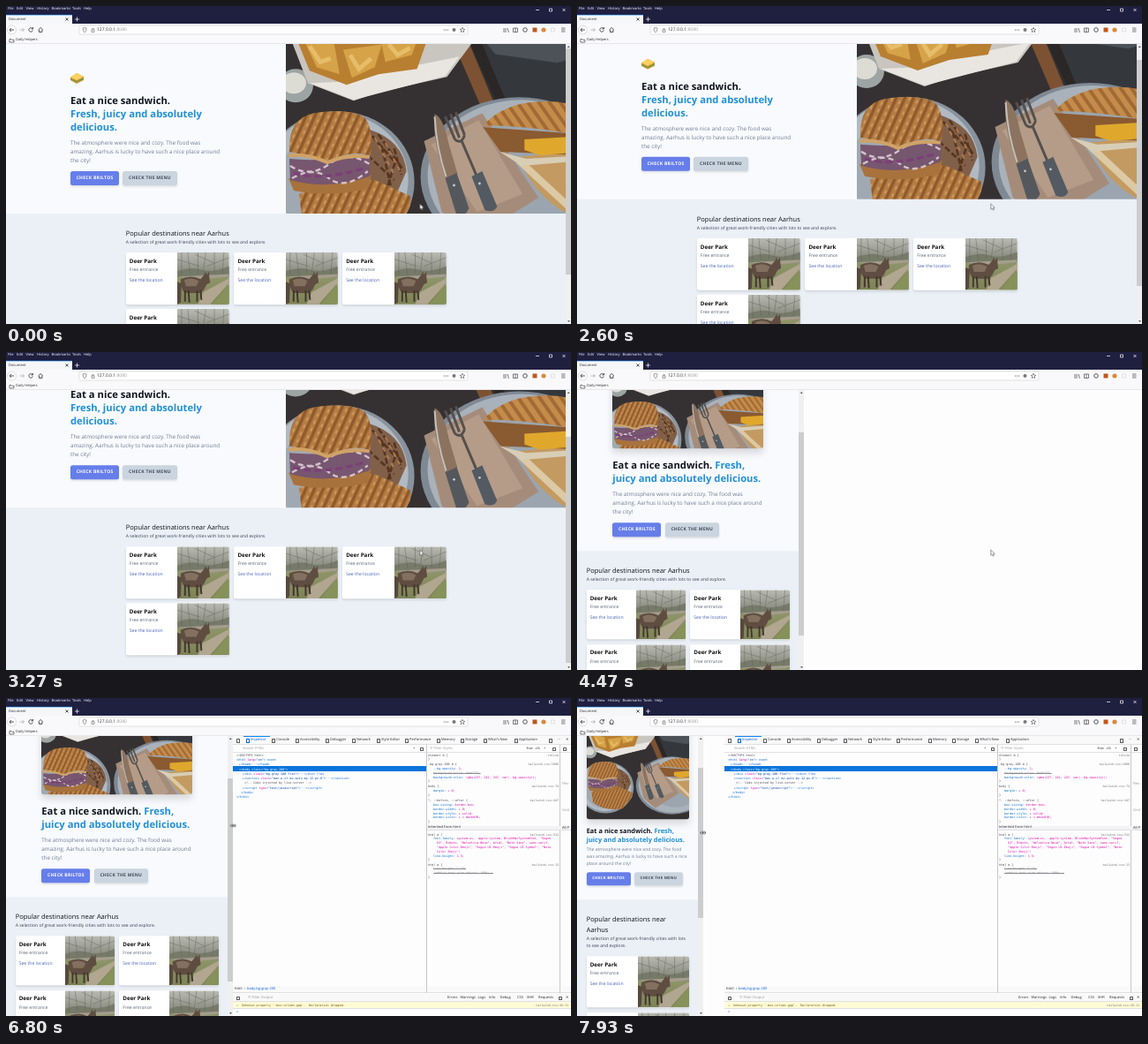
Write an HTML page that moves like this. It is 640x360 px and loops after 8000 ms.

```html
<!DOCTYPE html>
<html lang="en">
<head>
<meta charset="utf-8">
<title>Responsive page</title>
<style>
html, body { margin: 0; width: 100%; height: 100%; overflow: hidden; background: #fff; }
body { position: relative; font-family: "Open Sans", "Noto Sans", sans-serif; text-rendering: geometricPrecision; }
#stage { position: absolute; left: 0; top: 0; width: 640px; height: 360px; overflow: hidden; background: #fdfdfe; }
#stage > svg, .bar, .layer { position: absolute; left: 0; top: 0; }
.layer { width: 640px; height: 360px; }
.t { position: absolute; margin-top: .7px; white-space: pre; line-height: 0; font-size: 4px; color: #2a2a2e; }
.menu { color: #fff; font-size: 4.1px; }
.url { font-size: 5px; }
.dim { color: #999; }
.on { color: #0060df; }
.right { transform: translateX(-100%); }

/* page */
#view { position: absolute; left: 0; top: 43px; width: 640px; height: 317px; overflow: hidden; container-type: inline-size; background: #ebf0f7; }
#page { width: calc(100% - 5.67px); }
#page h1, #page h2, #page h3, #page p { margin: 0; position: relative; top: .08em; }
.hero { display: flex; background: #f8fafd; }
.copy { width: 50%; box-sizing: border-box; padding: 32px 0 32px 73px; }
.side { width: 50%; position: relative; }
.side svg { position: absolute; width: 100%; height: 100%; }
.logo { display: block; width: 15px; height: 13.33px; }
.shot { display: none; width: 100%; border-radius: 2.7px; box-shadow: 0 5px 8px rgba(0,0,0,.14); }
h1 { max-width: 174px; font-size: 11.24px; line-height: 15px; color: #12161f; }
#page h1 { margin-top: 10.67px; }
h1 span { display: block; color: #2090d8; }
.copy p { width: 174px; font-size: 6.3px; line-height: 10px; color: #717d94; }
#page .copy p { margin-top: 5.33px; }
.buttons { display: flex; gap: 4.3px; margin-top: 8px; }
.buttons b { padding: 4px 6.67px; border-radius: 2.5px; font-size: 5.05px; line-height: 8px; font-weight: 700; letter-spacing: .05em; white-space: nowrap; background: #cbd5e0; color: #434d5e; box-shadow: 0 1.5px 2.5px rgba(0,0,0,.12); }
.buttons b:first-child { background: #667eea; color: #fff; }
section { max-width: 384px; box-sizing: border-box; margin: 0 auto; padding: 16px 10.67px; }
h2 { font-size: 7.5px; line-height: 12px; font-weight: 500; color: #10141c; }
section > p { font-size: 5.07px; line-height: 8px; color: #3a4454; }
.cards { display: grid; grid-template-columns: repeat(3, 1fr); gap: 5.33px; margin-top: 8px; }
.card { display: flex; background: #fff; border-radius: 2px; overflow: hidden; box-shadow: 0 1.5px 3px rgba(0,0,0,.13); }
.card div { width: 50%; box-sizing: border-box; padding: 4px 0 0 4px; white-space: nowrap; }
.card svg { width: 50%; aspect-ratio: 1; }
h3 { font-size: 6.27px; line-height: 10px; color: #111; }
.card p { font-size: 5.1px; line-height: 8px; color: #5c687a; }
#page .card p { margin-top: 1.5px; }
#page .card p + p { margin-top: 4px; color: #4a63b8; }
@container (max-width: 340px) {
  .copy { width: 192px; margin: 0 auto; padding: 16px 10.67px; }
  .side { display: none; }
  .shot { display: block; height: 85.33px; margin-top: 10.67px; }
  h1 span { display: inline; }
  .cards { grid-template-columns: repeat(2, 1fr); }
}
@container (max-width: 213px) {
  .copy { width: 100%; max-width: 149.3px; }
  .shot { height: auto; aspect-ratio: 1; margin-top: 8px; }
  h1 { font-size: 7.45px; line-height: 10px; }
  #page h1 { margin-top: 8px; }
  .copy p { width: auto; font-size: 5.05px; line-height: 8px; }
  #page .copy p { margin-top: 2.67px; }
  .buttons { margin-top: 5.33px; }
  .buttons b { font-size: 4.42px; line-height: 7px; }
  .cards { grid-template-columns: 1fr; }
}
#track { position: absolute; right: 0; top: 0; width: 5.67px; height: 100%; background: #f0f0f1; }
#track i { position: absolute; left: 1.4px; width: 3px; height: 2px; background: #606060; top: 2px; clip-path: polygon(50% 0, 100% 100%, 0 100%); }
#track i + i { top: auto; bottom: 2px; transform: scaleY(-1); }
#thumb { position: absolute; left: 0; width: 100%; background: #cdcdcd; }

/* inspector */
.bar { right: 0; background: #f9f9fa; border: solid #e0e0e2; border-width: 0 0 .5px; box-sizing: border-box; }
.selected { right: 164px; border: 0; background: #0a74da; }
.tabline { left: 12px; top: 43px; width: 30px; height: .8px; border: 0; background: #0a84ff; }
.line { position: absolute; top: 53px; width: 1px; height: 281px; background: #c8c8cc; }
#dev { width: auto; right: 0; overflow: hidden; }
.code { font: 3.42px/0 "DejaVu Sans Mono", monospace; color: #0068cc; }
.code b { font-weight: 400; color: #dd00a9; }
.code i { font-style: normal; color: #003eaa; }
.pick, .pick b, .pick i { color: #fff; }
.plain { color: #4a4a50; }
.off, .off b { color: #8a8a90; text-decoration: line-through; }
.src { color: #737373; }
.warning { color: #715100; }
.ico { position: absolute; width: 2.4px; height: 2.4px; margin: -1.6px 0 0; border: .5px solid #5c5c61; border-radius: .6px; }
.ico.on { border-color: #0060df; }
</style>
</head>
<body>
<svg width="0" height="0" style="position:absolute">
  <defs>
    <pattern id="grill" width="9" height="9" patternUnits="userSpaceOnUse" patternTransform="rotate(24)">
      <path d="M0 0H9V9H0Z" fill="#b67d44"/><path d="M0 0H3.500V9H0Z" fill="#8f5a2c"/><path d="M6 1h2v4h-2z" fill="#cb9a5c"/>
    </pattern>
    <pattern id="grill2" width="10" height="8" patternUnits="userSpaceOnUse" patternTransform="rotate(-35)">
      <path d="M0 0H10V8H0Z" fill="#c48b4a"/><path d="M0 0H4V8H0Z" fill="#a16a35"/>
    </pattern>
    <linearGradient id="park" x2="0" y2="1">
      <stop stop-color="#b9bab2"/><stop offset=".42" stop-color="#85867a"/><stop offset=".5" stop-color="#8d9468"/><stop offset="1" stop-color="#7d8355"/>
    </linearGradient>
    <filter id="soft" x="0" y="0" width="1" height="1"><feGaussianBlur stdDeviation=".8"/></filter>
    <g id="lunch" filter="url(#soft)">
      <path d="M300-40H655V319H300Z" fill="#353132"/>
      <path d="M535 30H655V112L565 105Z" fill="#34383d"/>
      <path d="M545 43l10 12 70 10 30-8V30H545z" fill="#4c5258"/>
      <path d="M502 30h18l34 82-14 6z" fill="#7d5232"/>
      <path d="M520 30h14l34 80-10 3z" fill="#2b2726"/>
      <ellipse cx="328" cy="91" rx="20" ry="19" fill="#9da4a4"/><ellipse cx="326" cy="88" rx="14" ry="12" fill="#dddcd4"/>
      <path d="M318 26L342 88l52 20 30-10 76-17 28-38 6-18z" fill="#c9c5bf"/>
      <path d="M344 88l50 19 104-27 16-22-70 14-50 14z" fill="#e9e6e1"/>
      <path d="M326 30l18 44 42 16 36-12 44-6 16-46z" fill="#b87f31"/>
      <path d="M336 36l16 34 26 8-6-34zM382 50l10 32 26-12 8-26zM424 36l6 28 30-8 8-22z" fill="#d6a348"/>
      <path d="M344 46l12 18 12-4M390 56l10 16 14-12M434 44l10 12 14-8" fill="none" stroke="#e6bd69" stroke-width="5"/>
      <ellipse cx="376" cy="200" rx="87" ry="80" fill="#89939d"/><ellipse cx="374" cy="198" rx="82" ry="76" fill="#b1bac2"/>
      <ellipse cx="376" cy="202" rx="68" ry="64" fill="#a0a9b2"/>
      <path d="M410 140q40 12 44 48l-14 32-36-18z" fill="#81604a"/>
      <path d="M415 148l26 30-8 26M422 146l28 40M410 170l30 28M426 160l10 44M440 162l8 30" fill="none" stroke="#58351f" stroke-width="2.600" stroke-dasharray="7 3"/>
      <path d="M418 150l22 42M430 156l18 34" fill="none" stroke="#b17b4a" stroke-width="2" stroke-dasharray="5 5"/>
      <path d="M332 214q40-18 86-16l40 18q4 14-10 26l-20 24q-60 8-92-20z" fill="url(#grill)"/>
      <path d="M320 196q44 14 94-4l-4 16q-44 10-84 2z" fill="#a8723c"/>
      <path d="M321 174q40 4 92-6l-1 26q-48 16-90 4z" fill="#77566f"/>
      <path d="M322 182q22 14 44-2t46 0M324 196q24-14 42 0t44-8" fill="none" stroke="#d3c1cc" stroke-width="2.400" stroke-dasharray="6 4"/>
      <path d="M326 190q30 10 82-6" fill="none" stroke="#7b3f78" stroke-width="3" stroke-dasharray="8 4"/>
      <path d="M321 166q-2-38 28-44 38-6 56 4 12 10 8 44-20-6-48 6-24-6-44-10z" fill="url(#grill)"/>
      <path d="M320 170q22-2 44 8 24-10 48-6" fill="none" stroke="#cfa367" stroke-width="4"/>
      <ellipse cx="582" cy="194" rx="112" ry="90" fill="#7f8994"/><ellipse cx="584" cy="193" rx="106" ry="86" fill="#a9b1ba"/>
      <ellipse cx="592" cy="192" rx="84" ry="70" fill="#9ba5af"/>
      <path d="M474 154l66-32 64 96-74 46-36-30z" fill="#a58c7a"/><path d="M482 158l54-28 50 84-52 20z" fill="#b59c89"/>
      <path d="M486 123q10 4 16 34l10 34-13 5q-16-40-13-73z" fill="#8c7360"/><path d="M486 126q2 36 13 68" fill="none" stroke="#c3bfba" stroke-width="2"/>
      <path d="M498 196l13-6 14 40q-4 10-14 8z" fill="#54585c"/>
      <path d="M498 126l11 26M504 123l10 27M510 121l10 26M509 152q7 6 11-5M516 152l18 42" fill="none" stroke="#55504d" stroke-width="3"/>
      <path d="M528 194l12-6 17 40q-4 8-14 4z" fill="#535a61"/>
      <circle cx="508" cy="204" r="1.400" fill="#c9cbd0"/><circle cx="537" cy="202" r="1.400" fill="#c9cbd0"/>
      <path d="M580 172l75-8v80q-50-16-75-72z" fill="#c39a62"/><path d="M582 176l56 52" stroke="#dcc9a5" stroke-width="8"/>
      <path d="M541 138l114 8v24l-94-4z" fill="#8a5a30"/>
      <path d="M588 152l67-4v18l-50 4-17-6z" fill="#dfa82c"/>
      <path d="M560 166l30 8 65-4v6l-70 6z" fill="#d8ceb6"/>
      <path d="M542 136q12-16 40-24 40-8 73 4v32q-60-12-113-12z" fill="url(#grill2)"/>
    </g>
    <g id="deer">
      <path d="M0 0H60V60H0Z" fill="url(#park)"/>
      <path d="M0 22q16-6 28-2t32-4v12H0z" fill="#767a68"/>
      <path d="M5 0v26M12 0l3 25M24 0v24M33 0l-3 23M43 0v24M54 0l-2 28M0 8l26 8M60 6L34 16M20 2l22 10" fill="none" stroke="#5f6056" stroke-opacity=".45"/>
      <path d="M0 28l60-3v3L30 31z" fill="#a49d8d"/>
      <path d="M30 46l30-16v5L38 60H24z" fill="#b1a690"/><path d="M60 38v22H40z" fill="#87915a"/>
      <path d="M4 31q12-6 23 0l4-5 2-4 1 4 3-4 0 5 1 8-4 2-3 6-4 4H9q-6-6-5-16z" fill="#5f4d41"/>
      <path d="M8 32q9-4 17 1l-3 6H10z" fill="#83705f"/>
      <path d="M9 44v13M13 44l1 14M23 44v13M27 44l1 11" stroke="#43362d" stroke-width="2"/>
      <path d="M0 34l5 2-1 22-4 2z" fill="#57483d"/>
    </g>
  </defs>
</svg>

<div id="stage">
  <div id="view">
    <div id="page">
      <div class="hero">
        <div class="copy">
          <svg class="logo" viewBox="0 0 15 13.300"><path d="M0 6l7-5 8 4v4l-8 4-7-4z" fill="#d8963f"/><path d="M0 7l7 3 8-4v2l-8 3.400-7-3z" fill="#7a9a3b"/><path d="M0 5.500L7 1l8 4-8 4z" fill="#fbd25f"/></svg>
          <svg class="shot" viewBox="317 -19 318 318" preserveAspectRatio="xMidYMid slice"><use href="#lunch"/></svg>
          <h1>Eat a nice sandwich. <span>Fresh, juicy and absolutely delicious.</span></h1>
          <p>The atmosphere were nice and cozy. The food was amazing. Aarhus is lucky to have such a nice place around the city!</p>
          <div class="buttons"><b>CHECK BRILTOS</b><b>CHECK THE MENU</b></div>
        </div>
        <div class="side"><svg viewBox="317 -19 318 318" preserveAspectRatio="xMidYMid slice"><use href="#lunch"/></svg></div>
      </div>
      <section>
        <h2>Popular destinations near Aarhus</h2>
        <p>A selection of great work-friendly cities with lots to see and explore.</p>
        <div class="cards" id="cards"></div>
      </section>
    </div>
    <div id="track"><i></i><i></i><div id="thumb"></div></div>
  </div>

  <div id="dev" class="layer"></div>
  <div id="rules" class="layer"></div>

  <svg width="640" height="43">
    <path d="M0 0H640V20H0Z" fill="#1f1f40"/>
    <path d="M0 10H75V20H0Z" fill="#f5f6f7"/><path d="M0 10.200H75" stroke="#0a84ff" stroke-width=".6"/>
    <path d="M0 20H640V43H0Z" fill="#f9f9fb"/><path d="M0 42.700H640" stroke="#d5d5d9" stroke-width=".6"/>
    <rect x="83" y="22" width="440" height="10" rx="1" fill="#fff" stroke="#d2d2d6" stroke-width=".6"/>
    <g fill="none" stroke="#fff" stroke-width=".7"><path d="M600 4.500h4M630.500 3l3 3m0-3l-3 3M78 15h5M80.500 12.500v5"/><path d="M615.500 3h3v3h-3z"/></g>
    <g fill="none" stroke="#45454b" stroke-width=".9">
      <circle cx="6.500" cy="27" r="5" fill="#fff" stroke="#bbb" stroke-width=".5"/>
      <path d="M9 27H4m2-2l-2 2 2 2M67.500 13.500l3 3m0-3l-3 3"/>
      <path d="M15.500 27h5m-2-2l2 2-2 2" stroke="#b5b5ba"/>
      <path d="M30 25.500a2.300 2.300 0 1 0 .4 2M30.500 24v2h-2M36.500 27l2.700-2.500 2.700 2.500M37.500 27v2.500h3.400V27"/>
      <path d="M87 25q2 0 2-1 0 1 2 1 0 4-2 5-2-1-2-5zM97 27h3v2.500h-3zM97.500 27v-1q1-2 2 0v1" stroke="#77777c" stroke-width=".7"/>
      <path d="M517 24.300l.8 1.900 2 .2-1.500 1.300.5 2-1.800-1.100-1.800 1.100.5-2-1.500-1.300 2-.2z" stroke-width=".6"/>
      <path d="M564 25v5M566 25v5M568 25l1.500 5M574.500 25h5v4.500h-5zM577 25v4.500M4 37.500h2l.6.800H9v2.700H4z" stroke-width=".7"/>
      <circle cx="588" cy="27" r="2.300"/><path d="M617.500 25h4v4h-4z" stroke="#ddd"/>
      <path d="M629 25h4.500M629 27h4.500M629 29h4.500" stroke-width=".7"/>
    </g>
    <g fill="#45454b"><circle cx="496.500" cy="27" r=".6"/><circle cx="498.500" cy="27" r=".6"/><circle cx="500.500" cy="27" r=".6"/></g>
    <circle cx="507.500" cy="27" r="2" fill="#77777c"/>
    <path d="M596.500 24.500h5v5h-5z" fill="#c2571a"/><circle cx="609" cy="27" r="2.600" fill="#d98a3c"/>
  </svg>
  <div id="labels" class="layer"></div>

  <svg id="arrow" width="8" height="10"><path d="M.5.5v6.200l1.500-1.200 1 2 1-.5-.9-2h1.900z" fill="#fff" stroke="#333" stroke-width=".5"/></svg>
  <svg id="resize" width="10" height="6"><path d="M1 3h7M2.600 1.300L1 3l1.600 1.700M6.400 1.300L8 3 6.400 4.700" fill="none" stroke="#fff" stroke-width="1.800"/><path d="M1 3h7M2.600 1.300L1 3l1.600 1.700M6.400 1.300L8 3 6.400 4.700M4 1.500v3M5 1.500v3" fill="none" stroke="#333" stroke-width=".7"/></svg>
</div>

<script>
const LOOP = 8000;
const $ = id => document.getElementById(id);
const esc = s => s.replace(/&/g, '&amp;').replace(/</g, '&lt;').replace(/>/g, '&gt;');
const label = (x, y, html, cls = '') => `<span class="t ${cls}" style="left:${x}px;top:${y}px">${html}</span>`;
const bar = (x, y, h, bg = '#f9f9fa') => `<div class="bar" style="left:${x}px;top:${y}px;height:${h}px;background:${bg}"></div>`;
const icon = (x, y, cls = '') => `<div class="ico ${cls}" style="left:${x}px;top:${y}px"></div>`;
const row = (y, items, cls) => items.map(([x, text]) => label(x, y, text, cls)).join('');
const line = x => `<div class="line" style="left:${x}px"></div>`;

$('cards').innerHTML = `<div class="card">
  <div><h3>Deer Park</h3><p>Free entrance</p><p>See the location</p></div>
  <svg viewBox="0 0 60 60"><use href="#deer"/></svg></div>`.repeat(4);

$('labels').innerHTML =
  row(3, [[2, 'File'], [12, 'Edit'], [22.5, 'View'], [35, 'History'], [51.5, 'Bookmarks'], [75, 'Tools'], [88, 'Help']], 'menu') +
  label(3, 15, 'Document') + label(11, 38.6, 'Daily Helpers') +
  label(103, 26.6, '127.0.0.1<span class="dim">:8080</span>', 'url');

// Markup side of the inspector; x is measured from its left edge.
const tabs = [[20, 'Inspector'], [49, 'Console'], [76, 'Accessibility'], [110, 'Debugger'], [140, 'Network'], [168, 'Style Editor'],
  [200, 'Performance'], [236, 'Memory'], [263, 'Storage'], [289, "What's New"], [324, 'Application']];
const tree = [
  [4, '<!DOCTYPE html>', 'plain'], [4, '<html lang="en"> event'], [7, '▸<head>···</head>'], [7, '▾<body class="bg-gray-200">', 'pick'],
  [11, '▸<div class="bg-gray-100 flex">···</div> flex'], [11, '▸<section class="max-w-xl mx-auto my-12 px-6">···</section>'],
  [13, '<!-- Code injected by live-server -->', 'plain'], [11, '▸<script type="text/javascript">···<\/script>'], [9, '</body>'], [4, '</html>']];
const markup = s => esc(s).replace(/(\w+)=("[^"]*")/g, '<b>$1</b>=<i>$2</i>');

$('dev').innerHTML =
  `<div id="frame">${bar(0, 43, 10)}${bar(0, 53, 8.5, '#fff')}${bar(0, 326, 8)}${bar(0, 335, 8.5)}<div class="bar tabline"></div>` +
  tabs.map(([x, name], i) => icon(x - 5, 48, i ? '' : 'on') + label(x, 47.5, name, i ? '' : 'on')).join('') +
  icon(3.5, 48) + label(11, 57, 'Search HTML', 'dim') + icon(3.5, 339.3) + label(17, 339, '⛛ Filter Output', 'dim') + '</div>' +
  `<div id="tree"><div class="bar selected" style="top:77.2px;height:5.4px"></div>` +
  tree.map(([x, s, cls = ''], i) => label(x, 64 + i * 5.3, markup(s), 'code ' + cls)).join('') +
  label(2, 329.6, 'html &nbsp;›&nbsp; <span class="on">body.bg-gray-200</span>') + label(4, 355.5, '»', 'on') + '</div>' +
  `<div id="warn">${bar(0, 344, 7.5, '#fffbd6')}` +
  label(4, 347.5, "⚠  Unknown property '-moz-column-gap'.  Declaration dropped.", 'code warning') + '</div>';

// Style rules: top line, selector, source, declarations ("~" marks an overridden one).
const rules = [
  [64, 'element ⚙ {', 'inline', []],
  [74.5, '.bg-gray-200 ⚙ {', 'tailwind.css:1086', ['--bg-opacity: 1;', '~background-color: #edf2f7;', 'background-color: rgba(237, 242, 247, var(--bg-opacity));']],
  [99.5, 'body {', 'tailwind.css:74', ['margin: ▸ 0;']],
  [115.5, '*, ::before, ::after {', 'tailwind.css:447', ['box-sizing: border-box;', 'border-width: ▸ 0;', 'border-style: ▸ solid;', 'border-color: ▸ ○ #e2e8f0;']],
  [154, 'html ⚙ {', 'tailwind.css:312', ['font-family: system-ui, -apple-system, BlinkMacSystemFont, "Segoe',
    '  UI", Roboto, "Helvetica Neue", Arial, "Noto Sans", sans-serif,', '  "Apple Color Emoji", "Segoe UI Emoji", "Segoe UI Symbol", "Noto',
    '  Color Emoji";', 'line-height: 1.5;']],
  [188, 'html ⚙ {', 'tailwind.css:13', ['~line-height: 1.15;', '~-webkit-text-size-adjust: 100%; ⚠']]];
const declaration = s => s.includes(':') ? esc(s).replace(/^~?([\w-]+:)(.*)/, '$1<b>$2</b>') : `<b>${esc(s)}</b>`;
const rule = ([y, selector, source, lines]) =>
  label(478, y, selector, 'code plain') + label(626, y, source, 'code src right') +
  lines.map((s, i) => label(484, y + 4.8 * (i + 1), declaration(s), 'code ' + (s[0] === '~' ? 'off' : ''))).join('') +
  label(478, y + 4.8 * (lines.length + 1), '}', 'code plain');

$('rules').innerHTML = line(476) + line(627) + bar(477, 144.5, 5.5, '#f3f3f6') +
  rules.map(rule).join('') + label(478, 146.8, 'Inherited from html') +
  row(57, [[461, '+'], [589, ':hov'], [599, '.cls'], [609, '+']]) + icon(469, 57.3) + icon(619, 57.3) + icon(631, 57.3) +
  label(480, 57, '⛛ Filter Styles', 'dim') + icon(615, 48) + row(47.5, [[625, '···'], [634, '✕']]) +
  row(339, [[500, 'Errors'], [514.5, 'Warnings'], [534.5, 'Logs'], [547, 'Info'], [559.5, 'Debug'], [579, 'CSS'], [590, 'XHR'], [603, 'Requests'], [634, '✕']]) +
  icon(626, 339.3) + label(637, 347.5, 'tailwind.css:45:11', 'code src right') +
  row(97, [[630, 'Flex']], 'dim') + row(127, [[630, 'Grid']], 'dim') + label(630, 147, 'All P');

// Each step is [ms, properties, easing]; without an easing the value is held.
function play(id, steps) {
  const frames = steps.map(([ms, props, easing = 'steps(1, end)']) => ({ ...props, offset: ms / LOOP, easing }));
  frames.push({ ...steps[steps.length - 1][1], offset: 1 });
  $(id).animate(frames, { duration: LOOP, iterations: Infinity });
}
const move = (x, y) => ({ transform: `translate(${x}px, ${y}px)` });
const width = w => ({ width: w + 'px' });
const left = x => ({ left: x + 'px' });
const show = opacity => ({ opacity });
const thumb = (top, height) => ({ top: top + 'px', height: height + 'px' });
const appear = (id, ms) => play(id, [[0, show(0)], [ms, show(1)]]);

const SPLIT = 4200, DRAG = 7130, DROP = 7930, LAG = 170;
const scroll = [[0, 0, 'linear'], [2530, 0, 'linear'], [2600, 16, 'linear'], [2670, 31, 'linear'], [2800, 48, 'linear'], [2930, 58.7]];
play('page', scroll.map(([ms, y, easing]) => [ms, move(0, -y), easing]));
play('thumb', [...scroll.map(([ms, y, easing]) => [ms, thumb(5 + y * .817, 256), easing]),
  [SPLIT, thumb(48, 230)], [7440, thumb(36, 170)]]);
play('view', [[0, width(640)], [SPLIT, width(257)], [DRAG, width(257), 'linear'], [DROP, width(143)]]);
play('dev', [[0, left(257)], [DRAG + LAG, left(257), 'linear'], [DROP, left(167)]]);
appear('frame', 4600);
appear('tree', 4870);
appear('rules', 5070);
appear('warn', 5200);
const rest = move(468.3, 223.5), edge = move(257, 144.5), grip = move(252.5, 141.5);
play('arrow', [[0, { ...rest, ...show(1) }], [5930, { ...rest, ...show(1) }, 'ease-in-out'],
  [6270, { ...edge, ...show(1) }], [6600, { ...edge, ...show(0) }]]);
play('resize', [[0, { ...grip, ...show(0) }], [6800, { ...grip, ...show(1) }],
  [DRAG, { ...grip, ...show(1) }, 'linear'], [DROP, { ...move(138, 149.5), ...show(1) }]]);
</script>
</body>
</html>
```
